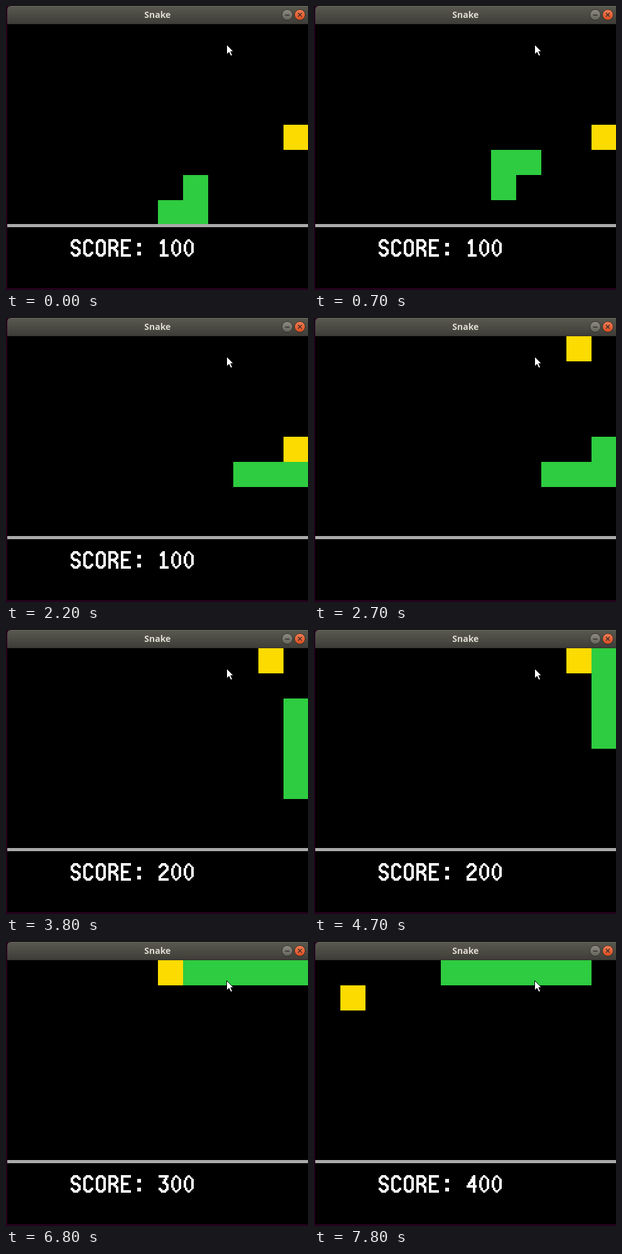
An HTML page with a canvas that plays this animation: 481 px wide and 452 px high, repeating every 8000 ms.

```html
<!DOCTYPE html>
<html lang="en">
<head>
<meta charset="utf-8">
<title>Snake</title>
<style>
  html, body { margin: 0; width: 100%; height: 100%; overflow: hidden; background: #000; }
  canvas, svg { position: absolute; left: 0; top: 0; display: block; }
  text { font: bold 14px "Open Sans", "Noto Sans", sans-serif; fill: #dfdbd2; text-anchor: middle; }
</style>
</head>
<body>
<canvas id="game" width="481" height="452" role="img" aria-label="Snake game with score"></canvas>
<svg width="481" height="452" viewBox="0 0 481 452">
  <defs>
    <linearGradient id="bar" x2="0" y2="1">
      <stop offset="0" stop-color="#5a594f"/>
      <stop offset="1" stop-color="#3d3c37"/>
    </linearGradient>
    <linearGradient id="grey" x2="0" y2="1">
      <stop offset="0" stop-color="#8d8b82"/>
      <stop offset="1" stop-color="#65645c"/>
    </linearGradient>
    <linearGradient id="orange" x2="0" y2="1">
      <stop offset="0" stop-color="#f37f56"/>
      <stop offset="1" stop-color="#dd4b1d"/>
    </linearGradient>
  </defs>
  <path d="M0 0H2V449H481V452H0Z" fill="#26001d"/>
  <path d="M0 0H8L2 6Z" fill="#26001d"/>
  <path d="M2 29V6Q2 0 8 0H481V29Z" fill="url(#bar)"/>
  <path d="M7 .5H481" stroke="#6b6a60"/>
  <path d="M2 28.5H481" stroke="#33322e"/>
  <text x="241.3" y="19">Snake</text>
  <g stroke="#2f2e2a">
    <circle cx="448" cy="14" r="8.5" fill="url(#grey)"/>
    <circle cx="468" cy="14" r="8.5" fill="url(#orange)"/>
    <path d="M444.5 14.5H451.5M465 11L471 17M471 11L465 17" fill="none" stroke-width="1.3"/>
  </g>
  <path d="M351.5 61.5V77L355.2 73.6L358 79.5L360.6 78.3L357.9 72.6H362.3Z"
        fill="#fff" stroke="#000" stroke-width="1"/>
</svg>
<script>
const LOOP = 8000, CELL = 40, LEFT = 2, TOP = 29;
const ctx = document.getElementById("game").getContext("2d");

// One move per time; the first two directions lay out the starting body.
const moveTimes = [200, 700, 1200, 1700, 2200, 2700, 3300, 3800,
                   4200, 4700, 5200, 5800, 6300, 6800, 7200, 7800];
const directions = "RU" + "URRRRUUUUULLLLLL";
const delta = { U: [0, -1], R: [1, 0], L: [-1, 0] };

const path = [[6, 7]];
for (const d of directions) {
  const [x, y] = path[path.length - 1];
  path.push([x + delta[d][0], y + delta[d][1]]);
}

// Each stage starts when food is eaten; the score is hidden until `show`.
const stages = [
  { at: 0,    show: 0,    food: [11, 4] },
  { at: 2700, show: 2800, food: [10, 0] },
  { at: 5200, show: 5300, food: [6, 0] },
  { at: 7200, show: 7400, food: [1, 1] }
];

// Pen strokes on a grid: each pair is x and hexadecimal y.
const glyphs = {
  S: "62 40 20 02 04 26 46 68 6a 4c 2c 0a",
  C: "62 40 20 02 0a 2c 4c 6a",
  O: "40 62 6a 4c 2c 0a 02 20 40",
  R: "0c 00 40 62 64 46 06;36 69 6c",
  E: "60 00 0c 6c;06 46",
  ":": "33 43 44 34;3a 4a 4b 3b",
  0: "30 12 04 09 1b 3d 5b 69 64 52 30",
  1: "12 30 3c;1c 6c",
  2: "02 20 40 62 64 0a 0c 6c",
  3: "00 60 35 45 67 6a 4c 2c 0a",
  4: "5c 50 08 68"
};

function box(x, y, w, h, color) {
  ctx.fillStyle = color;
  ctx.fillRect(x, y, w, h);
}

function cell([x, y], color) {
  box(LEFT + x * CELL, TOP + y * CELL, CELL, CELL, color);
}

function drawGlyph(ch, left, top) {
  const penHeight = ch === "0" ? 2 : 4;
  for (const stroke of (glyphs[ch] || "").split(";")) {
    const points = stroke.split(" ").map(p => [...p].map(c => parseInt(c, 16)));
    for (let i = 1; i < points.length; i++) {
      const [x, y] = points[i - 1];
      const dx = points[i][0] - x, dy = points[i][1] - y;
      const n = Math.max(Math.abs(dx), Math.abs(dy));
      for (let k = 0; k <= n; k++) {
        box(left + 2 * Math.round(x + dx * k / n),
            top + 2 * Math.round(y + dy * k / n), 4, penHeight, "#fff");
      }
    }
  }
}

function drawText(text, left, top) {
  [...text].forEach((ch, i) => drawGlyph(ch, left + i * 20, top));
}

function draw(t) {
  const level = stages.filter(s => t >= s.at).length;
  const stage = stages[level - 1];
  const end = 3 + moveTimes.filter(m => t >= m).length;

  box(0, 0, 481, 452, "#000");
  cell(stage.food, "#fcdb00");
  path.slice(end - 2 - level, end).forEach(p => cell(p, "#2ecc40"));
  box(2, 347, 479, 5, "#aaa");
  if (t >= stage.show) drawText("SCORE: " + level * 100, 103, 371);
}

function tick() {
  draw(performance.now() % LOOP);
  requestAnimationFrame(tick);
}
tick();
</script>
</body>
</html>
```
